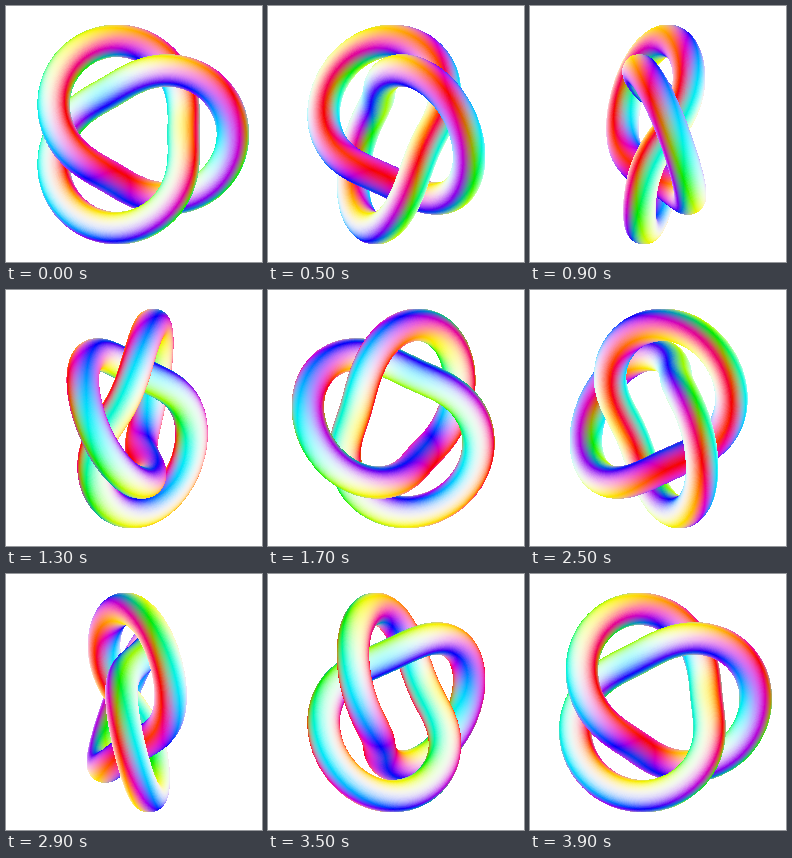
Animation of 256x256 px, one loop 4000 ms. Source, as an HTML page with a canvas:

```html
<!DOCTYPE html>
<html lang="en">
<head>
<meta charset="utf-8">
<title>Turning trefoil knot</title>
<style>
  html, body { margin: 0; width: 100%; height: 100%; overflow: hidden; background: #fff; }
  canvas { display: block; width: 256px; height: 256px; }
</style>
</head>
<body>
<canvas id="stage" width="256" height="256"></canvas>
<script>
const SIZE = 256, CENTER = 128.5;
const SCALE = 24.6, TUBE = 15.8;
const LOOP = 4000, STEP = 100, STEPS = LOOP / STEP;
const ALONG = 2000, AROUND = 180, COUNT = ALONG * AROUND;

const ctx = document.getElementById('stage').getContext('2d');
const image = ctx.createImageData(SIZE, SIZE);
const pixels = new Uint32Array(image.data.buffer);
const depth = new Float32Array(SIZE * SIZE);

const px = new Float32Array(COUNT);
const py = new Float32Array(COUNT);
const pz = new Float32Array(COUNT);
const tint = new Uint32Array(COUNT);

// Two-sided red, green and blue lights that turn with the knot
const LIGHTS = [
  [0.20, 0.55, 0.81],
  [-0.68, 0.52, 0.52],
  [-0.55, -0.42, 0.72]
];

function shade(x, y, z) {
  let color = 0xff000000;
  LIGHTS.forEach(([lx, ly, lz], i) => {
    const facing = x * lx + y * ly + z * lz;
    const level = Math.abs(Math.sin(facing * Math.PI / 2));
    color |= Math.round(255 * level) << (8 * i);
  });
  return color >>> 0;
}

function knot(a) {
  const ring = 3 + Math.cos(1.5 * a);
  return [ring * Math.cos(a), ring * Math.sin(a), Math.sin(1.5 * a)].map(c => c * SCALE);
}

function buildTube() {
  let k = 0;
  for (let i = 0; i < ALONG; i++) {
    const a = 4 * Math.PI * i / ALONG;
    const p = knot(a), before = knot(a - 0.001), after = knot(a + 0.001);
    const d = after.map((c, j) => c - before[j]);
    const len = Math.hypot(...d);
    const [tx, ty, tz] = d.map(c => c / len);
    const flat = Math.hypot(tx, ty);
    const sx = ty / flat, sy = -tx / flat;
    const ux = -tz * sy, uy = tz * sx, uz = tx * sy - ty * sx;
    for (let j = 0; j < AROUND; j++, k++) {
      const v = 2 * Math.PI * j / AROUND, c = Math.cos(v), s = Math.sin(v);
      const nx = c * sx + s * ux, ny = c * sy + s * uy, nz = s * uz;
      px[k] = p[0] + TUBE * nx;
      py[k] = p[1] + TUBE * ny;
      pz[k] = p[2] + TUBE * nz;
      tint[k] = shade(nx, ny, nz);
    }
  }
}

function draw(step) {
  const turn = 2 * Math.PI * step / STEPS;
  const c = Math.cos(turn), s = Math.sin(turn);
  pixels.fill(0xffffffff);
  depth.fill(-1e9);
  for (let k = 0; k < COUNT; k++) {
    const col = Math.floor(CENTER + px[k] * c - pz[k] * s);
    const row = Math.floor(CENTER - py[k]);
    const near = px[k] * s + pz[k] * c;
    const at = row * SIZE + col;
    if (near > depth[at]) {
      depth[at] = near;
      pixels[at] = tint[k];
    }
  }
  ctx.putImageData(image, 0, 0);
}

buildTube();
let shown = 0;
draw(0);
const start = performance.now();

function tick() {
  const time = Math.max(0, performance.now() - start) % LOOP;
  const step = Math.floor(time / STEP);
  if (step !== shown) draw(shown = step);
  requestAnimationFrame(tick);
}
requestAnimationFrame(tick);
</script>
</body>
</html>
```
